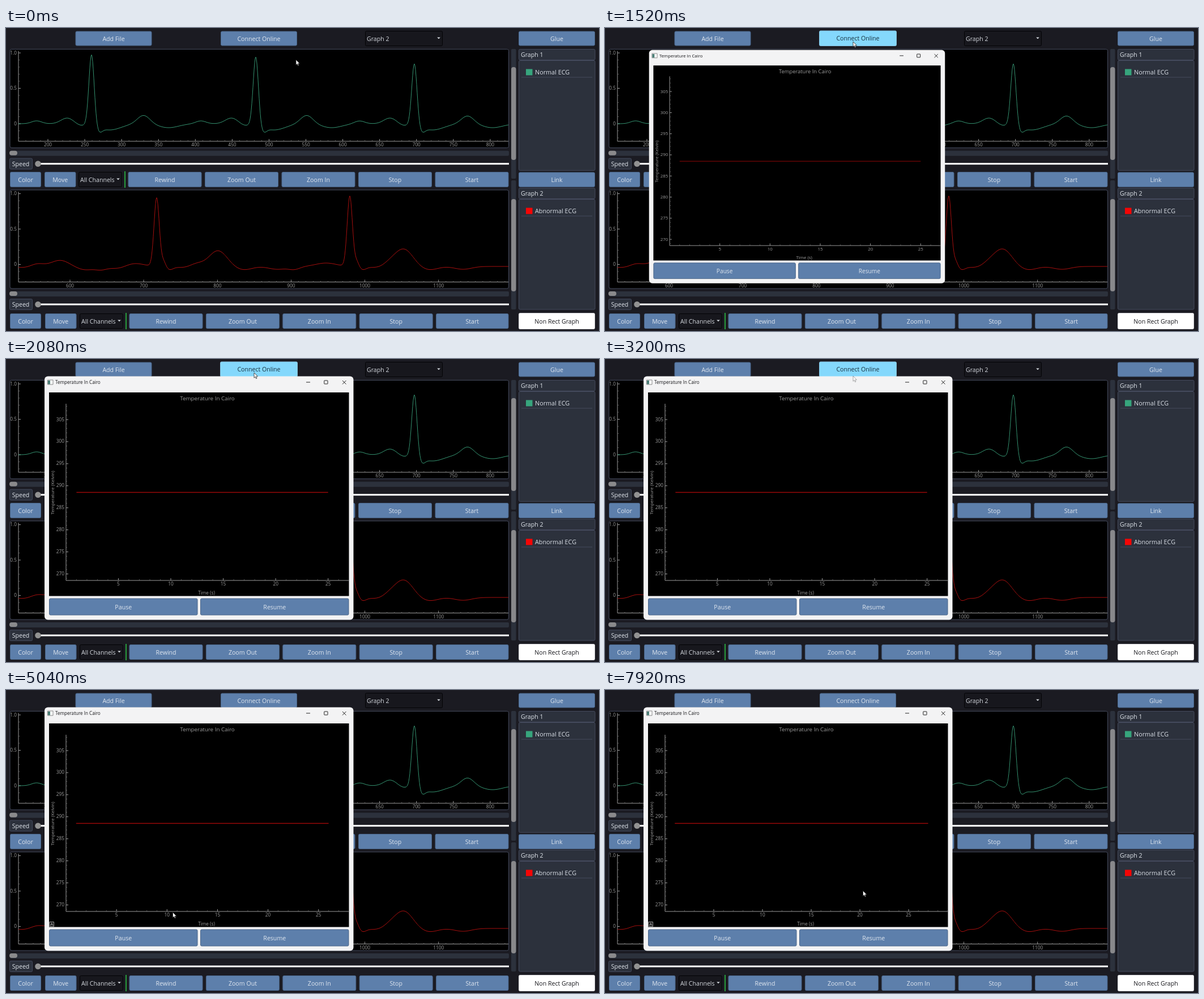
These frames come from a looping animation (1047 by 535 pixels, 8 s). An HTML page with a canvas:

```html
<!DOCTYPE html>
<html lang="en">
<head>
<meta charset="utf-8">
<title>ECG viewer</title>
<style>
html, body { margin: 0; width: 100%; height: 100%; overflow: hidden; background: #1b1b22; }
canvas { display: block; }
</style>
</head>
<body>
<canvas id="stage" width="1047" height="535"></canvas>
<script>
const ctx = document.getElementById('stage').getContext('2d');
const LOOP = 8000;
const BLUE = '#5d7fab', PANEL = '#2c313c', EDGE = '#444a5d', AXIS = '#9c9c9c', MINOR = '#606060';

// A heartbeat is a sum of bell curves. `around` sits relative to the spike,
// `after` relative to the recovery wave that follows it.
const bell = (x, center, height, width) => height * Math.exp(-(((x - center) / width) ** 2) / 2);

const NORMAL = {
  base: 169, color: '#34916f',
  beats: [
    { at: 151, height: 125, wait: 92, wave: 15 },
    { at: 441, height: 121, wait: 90, wave: 15 },
    { at: 721, height: 109, wait: 94, wave: 14 },
  ],
  around: [[-97, 5, 9], [-43, 10, 11], [-20, -3, 8], [14, -8, 5], [32, -11, 20]],
  after: [[44, -7, 18]],
  waveWidth: 11,
};
const ABNORMAL = {
  base: 421, color: '#a50f0e',
  beats: [
    { at: -15, height: 122, wait: 110, wave: 11 },
    { at: 266, height: 121, wait: 108, wave: 28 },
    { at: 607, height: 124, wait: 95, wave: 31 },
  ],
  around: [[-98, -5, 10], [-42, 6, 18], [12, 10, 4], [23, -5, 6], [60, -3, 22], [70, 7, 12]],
  after: [[45, -6, 15], [105, -5, 15]],
  waveWidth: 16,
};

function traceY(trace, x) {
  let rise = 0;
  for (const { at, height, wait, wave } of trace.beats) {
    const recovery = at + wait;
    rise += bell(x, at, height, 4.6) + bell(x, recovery, wave, trace.waveWidth);
    for (const [dx, h, w] of trace.around) rise += bell(x, at + dx, h, w);
    for (const [dx, h, w] of trace.after) rise += bell(x, recovery + dx, h, w);
  }
  return trace.base - rise;
}

function drawTrace(trace) {
  ctx.beginPath();
  for (let x = 22; x <= 887; x++) ctx.lineTo(x, traceY(trace, x));
  ctx.strokeStyle = trace.color;
  ctx.lineWidth = 1;
  ctx.stroke();
}

const clamp = v => Math.min(1, Math.max(0, v));
const span = (t, from, to) => clamp((t - from) / (to - from));
const smooth = p => p * p * (3 - 2 * p);

function box(x, y, right, bottom, fill, edge, radius = 2) {
  ctx.beginPath();
  ctx.roundRect(x, y, right - x, bottom - y, radius);
  if (fill) { ctx.fillStyle = fill; ctx.fill(); }
  if (edge) { ctx.strokeStyle = edge; ctx.lineWidth = 1; ctx.stroke(); }
}

function line(x1, y1, x2, y2, color, weight = 1) {
  ctx.beginPath();
  ctx.moveTo(x1, y1);
  ctx.lineTo(x2, y2);
  ctx.strokeStyle = color;
  ctx.lineWidth = weight;
  ctx.stroke();
}

function text(str, x, y, color = '#dfe4ea', size = 10.6, align = 'left') {
  ctx.font = `${size}px "Open Sans", "Noto Sans", sans-serif`;
  ctx.textAlign = align;
  ctx.textBaseline = 'middle';
  ctx.fillStyle = color;
  ctx.fillText(str, x, y + .7);
}

function button(label, x, y, right, bottom, fill = BLUE, color = '#dfe6ef', edge = '#4a6689') {
  box(x + .5, y + .5, right - .5, bottom - .5, fill, edge);
  text(label, (x + right) / 2, (y + bottom) / 2 + .7, color, 10.6, 'center');
}

function combo(label, x, y, right, bottom) {
  box(x + .5, y + .5, right - .5, bottom - .5, '#17171d', '#030305');
  text(label, x + 3, (y + bottom) / 2 + .7, '#d3d7dd');
  const ax = right - 7, ay = (y + bottom) / 2 - 1;
  ctx.beginPath();
  ctx.moveTo(ax - 2.8, ay - 1);
  ctx.lineTo(ax + 2.8, ay - 1);
  ctx.lineTo(ax, ay + 1.8);
  ctx.fillStyle = '#dfe4ea';
  ctx.fill();
}

// Majors carry labels, minors are short and dim; ticks point into the plot.
function axisX(y, left, right, toX, first, last, major, minor) {
  line(left, y, right, y, AXIS);
  for (let v = first; v <= last; v += minor) {
    const x = toX(v), isMajor = v % major === 0;
    if (x < left || x > right) continue;
    line(x, y, x, y - (isMajor ? 4 : 2), isMajor ? AXIS : MINOR);
    if (isMajor) text(v, x, y + 6.5, AXIS, 8.3, 'center');
  }
}

function axisY(x, top, bottom, toY, first, last, major, label) {
  line(x, top, x, bottom, AXIS);
  for (let v = first; v <= last; v++) {
    const y = toY(v), isMajor = v % major === 0;
    line(x, y, x + (isMajor ? 4 : 2), y, isMajor ? AXIS : MINOR);
    if (isMajor) text(label(v), x - 3, y - .3, AXIS, 8.3, 'right');
  }
}

function graph(top, x600, major, first, trace) {
  box(7, top + 1, 887.5, top + 175, '#000', EDGE, 3);
  axisY(22, top + 4, top + 163.5, v => top + 132.5 - v * 12.5, -2, 10, 5,
    v => v ? (v / 10).toFixed(1) : '0');
  axisX(top + 163.5, 22, 887, v => x600 + (v - 600) * 1.3015, first, 1200, major, 10);
  drawTrace(trace);
}

function controls(y, shift, speedY) {
  box(7, speedY - 23, 888, speedY - 14, PANEL);
  box(6, speedY - 23, 20, speedY - 15, '#8a8a8c', null, 4);
  box(6.5, speedY - 9.5, 46.5, speedY + 9.5, PANEL, EDGE);
  text('Speed', 26, speedY + .8, '#dfe4ea', 10.6, 'center');
  line(60, speedY, 888, speedY, '#fff', 3);
  ctx.beginPath();
  ctx.arc(56.5, speedY, 5.3, 0, 7);
  ctx.fillStyle = '#929292';
  ctx.fill();

  button('Color', 7, y, 62, y + 27);
  button('Move', 68 + shift / 2, y, 123.5 + shift / 2, y + 27);
  combo('All Channels', 128 + shift, y, 205 + shift, y + 27);
  line(210 + shift, y - 1, 210 + shift, y + 28, '#279b3c', 2);
  ['Rewind', 'Zoom Out', 'Zoom In', 'Stop', 'Start'].forEach((label, i) => {
    const x = 215.5 + 135.5 * i + shift * (1 - i * .05);
    button(label, x, y, i === 4 ? 887.5 : x + 130, y + 27);
  });
}

function channelList(title, top, name, color, bottom) {
  box(905.5, top + .5, 1040, top + 19.5, PANEL, EDGE);
  text(title, 909, top + 10.7);
  box(905.5, top + 20.5, 1040, bottom, PANEL, EDGE);
  box(918, top + 35.5, 929.5, top + 46.5, color, null, 0);
  text(name, 934, top + 41.5, '#d9dee6', 10.8);
  line(910, top + 50, 1035, top + 50, EDGE);
}

function scrollbar(top, bottom, from, to) {
  box(892, top, 900.5, bottom, PANEL);
  box(892, from, 900.5, to, '#88888b', null, 4);
}

function dashboard(hover) {
  ctx.fillStyle = '#1b1b22';
  ctx.fillRect(0, 0, 1047, 535);
  button('Add File', 122.5, 5.5, 257.5, 31.5);
  if (hover) button('Connect Online', 378, 4.5, 515, 32, '#84d8fc', '#18313f', '#86c4e4');
  else button('Connect Online', 379, 5.5, 514, 31.5);
  combo('Graph 2', 634, 5, 771, 32);
  button('Glue', 905, 5.5, 1040, 31.5);

  graph(36.5, 594.6, 50, 170, NORMAL);
  graph(285, 113, 100, 540, ABNORMAL);
  controls(254, 0, 239.7);
  controls(504, 2, 488);
  scrollbar(37, 266, 69, 233);
  scrollbar(269, 497, 302, 465);
  channelList('Graph 1', 37, 'Normal ECG', '#37a57d', 251.5);
  button('Link', 905, 254.5, 1040, 281);
  channelList('Graph 2', 282, 'Abnormal ECG', '#f50505', 497);
  button('Non Rect Graph', 905, 503, 1040, 532, '#fff', '#15151a', '#d4d4d8');
}

function temperatureWindow(samples, autoButton, opening) {
  box(68, 30.5, 613.5, 460.5, '#f3f3f4', null, 6);
  box(73.5, 37, 83, 45, '#fff', '#888', 0);
  box(74, 38, 78, 44.5, '#4b7f77', null, 0);
  text('Temperature In Cairo', 87, 41, '#17171a', 8.1);
  line(530, 41, 537, 41, '#222');
  box(561.8, 38, 568, 44, null, '#222', .5);
  line(594, 38, 600.5, 44.5, '#222');
  line(600.5, 38, 594, 44.5, '#222');

  ctx.fillStyle = '#000';
  ctx.fillRect(76, 59, 529.5, 359.5);
  text('Temperature In Cairo', 355.5, 70, AXIS, 9.8, 'center');
  axisY(106, 79, 391, v => 379.5 - (v - 270) * 7.786, 269, 308, 5, v => v);

  // The view rescales as every new sample widens the range.
  const extra = samples - 25;
  const start = 124.4 - .6 * extra, end = 568.7 + .9 * extra;
  const step = (end - start) / (samples - 1);
  axisX(391, 106, 605, v => start + (v - 1) * step, 1, 29, 5, 1);
  line(start, 235.5, end, 235.5, '#980808', opening ? 1 : 1.7);
  text('Time (s)', 354, 413, AXIS, 8.2, 'center');
  ctx.save();
  ctx.translate(82, 236);
  ctx.rotate(-Math.PI / 2);
  text('Temperature (Kelvin)', 0, 0, AXIS, 8, 'center');
  ctx.restore();
  if (autoButton) {
    box(76.8, 409.5, 84.5, 417.7, '#111', '#999', 0);
    text('A', 80.7, 413.4, '#ccc', 8, 'center');
  }
  button('Pause', 76, 422.5, 338.5, 452.5);
  button('Resume', 343, 422.5, 605.5, 452.5);
}

function pointer(x, y, alpha) {
  ctx.save();
  ctx.globalAlpha = alpha;
  ctx.translate(x, y);
  ctx.fillStyle = '#fff';
  ctx.strokeStyle = '#222';
  ctx.lineWidth = .8;
  const arrow = new Path2D('M0 0V9.3L2.1 7.4 3.5 10.6 5 10 3.6 6.9 6.4 6.7Z');
  ctx.fill(arrow);
  ctx.stroke(arrow);
  ctx.restore();
}

const MOVES = [
  { from: 160, to: 880, x: 438, y: 24 },
  { from: 3120, to: 3200, x: 438, y: 30 },
  { from: 3200, to: 4000, x: 294.5, y: 392.5 },
  { from: 7040, to: 7840, x: 455.5, y: 354.5 },
];

function pointerAt(t) {
  let x = 512, y = 56;
  for (const move of MOVES) {
    const p = smooth(span(t, move.from, move.to));
    x += (move.x - x) * p;
    y += (move.y - y) * p;
  }
  return [x, y];
}

function render(t) {
  const [x, y] = pointerAt(t);
  dashboard(t < 3280 && y < 32);
  if (t >= 1440) {
    const rest = (1 - span(t, 1440, 1680)) ** 3;
    const scale = 1 - .145 * rest;
    ctx.save();
    ctx.globalAlpha = clamp(1.3 - rest);
    ctx.translate(340.7 - 6 * rest, 245.5 - 2.4 * rest);
    ctx.scale(scale, scale);
    ctx.translate(-340.7, -245.5);
    temperatureWindow(t < 4480 ? 25 : t < 7120 ? 26 : 27, t > 3200 && y > 59, rest > 0);
    ctx.restore();
  }
  pointer(x, y, t >= 3200 && t < 3280 ? .45 : 1);
}

function tick() {
  render(performance.now() % LOOP);
  requestAnimationFrame(tick);
}
tick();
</script>
</body>
</html>
```
